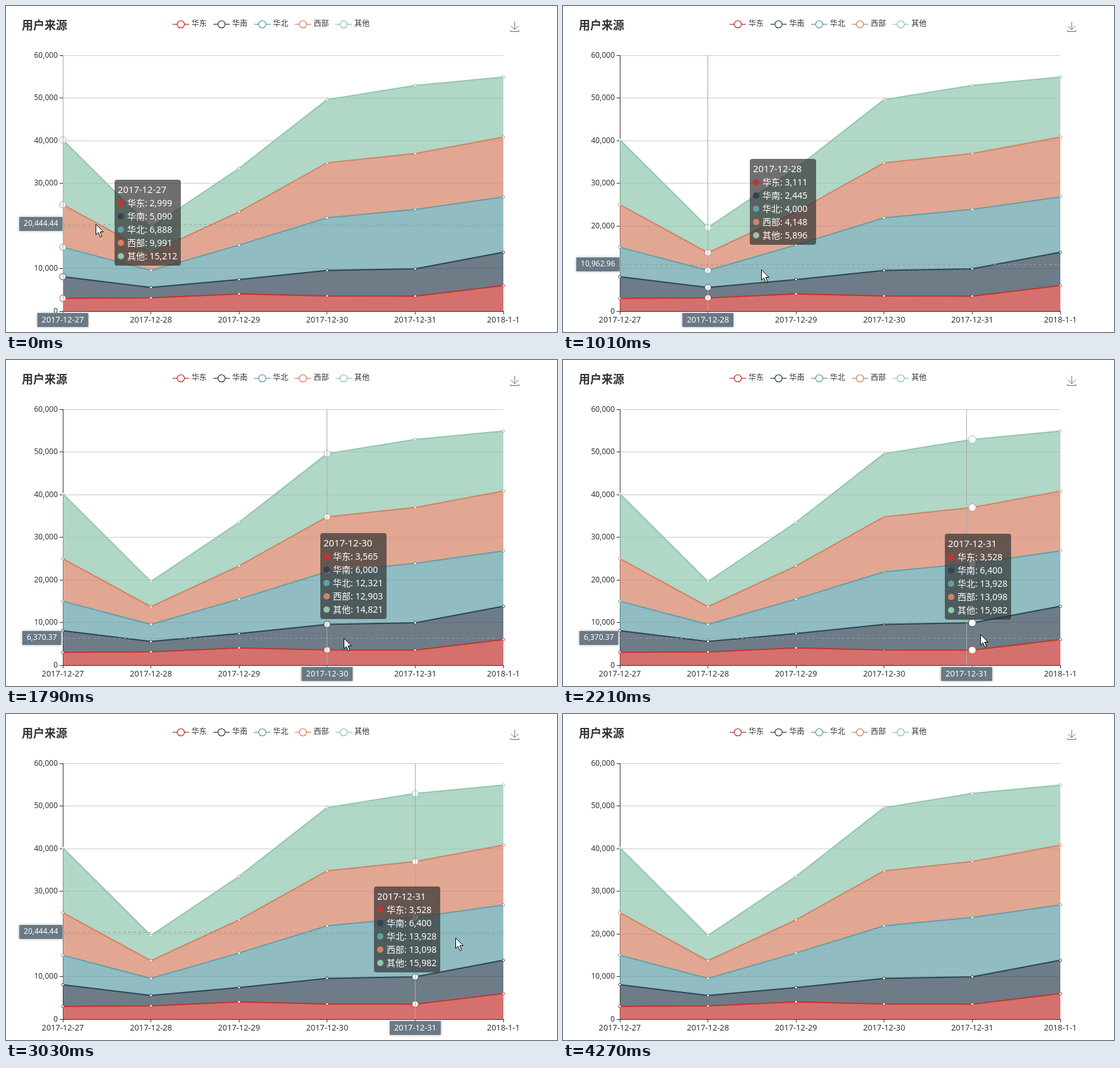
Recreate the animation shown at these times as an HTML page with a canvas. Size 873 by 516 pixels, loop 4420 ms.

```html
<!DOCTYPE html>
<html lang="zh">
<head>
<meta charset="utf-8">
<title>用户来源</title>
<style>
  html, body { margin: 0; width: 100%; height: 100%; overflow: hidden; background: #fff; }
  canvas { display: block; }
</style>
</head>
<body>
<canvas id="chart" width="873" height="516"></canvas>
<script>
const ctx = document.getElementById('chart').getContext('2d');
const LOOP = 4420, STEPS = 33;
const LEFT = 90, RIGHT = 788, TOP = 78, BASE = 483, MAX = 60000;
const FAMILY = '"Noto Sans", "Noto Sans CJK SC", "Noto Sans CJK", sans-serif';
const DATE_FONT = 12.8;

const days = ['2017-12-27', '2017-12-28', '2017-12-29', '2017-12-30', '2017-12-31', '2018-1-1'];
const series = [
  { name: '华东', color: '#c23531', data: [2999, 3111, 4040, 3565, 3528, 6000] },
  { name: '华南', color: '#2f4554', data: [5090, 2445, 3380, 6000, 6400, 7800] },
  { name: '华北', color: '#61a0a8', data: [6888, 4000, 8080, 12321, 13928, 12984] },
  { name: '西部', color: '#d48265', data: [9991, 4148, 7760, 12903, 13098, 14028] },
  { name: '其他', color: '#91c7ae', data: [15212, 5896, 10220, 14821, 15982, 14091] }
];

// Key points as [step, x, y]; the chart trails the cursor by one step.
const STEP = 0, X = 1, Y = 2;
const cursorPath = [[0, 142, 345], [3, 144, 377], [4, 145, 386], [11, 440, 440], [15, 567, 440],
  [16, 640, 440], [17, 661, 434], [20, 704, 349], [21, 710, 337], [24, 713, 362], [25, 733, 373],
  [26, 754, 393], [29, 822, 500]];
const tipPath = [[0, 172, 275], [4, 165, 210], [12, 427, 273], [17, 605, 275], [19, 691, 371],
  [21, 579, 213], [22, 584, 319], [24, 581, 227], [26, 582, 291], [28, 636, 270]];
const POINTER_END = 29, CURSOR_END = 30;

const mix = (a, b, p) => a + (b - a) * p;
const easeOut = p => 1 - (1 - Math.min(p, 1)) ** 3;
const xOf = i => mix(LEFT, RIGHT, i / 5);
const yOf = v => mix(BASE, TOP, v / MAX);
const crisp = v => Math.floor(v) + 0.5;

// Steps last 120 ms plus pauses of 30 ms that become more frequent.
const timeOf = step => 120 * step + 30 * Math.floor(Math.max(step / 4, 0.6 * (step - 8))) - 10;

// Reads column `to` of a path where its rising column `from` reaches `value`.
function lookup(path, from, value, to) {
  if (value <= path[0][from]) return path[0][to];
  const next = path.findIndex(key => key[from] > value);
  if (next < 0) return path[path.length - 1][to];
  const a = path[next - 1], b = path[next];
  return mix(a[to], b[to], (value - a[from]) / (b[from] - a[from]));
}

const pointAt = (path, step) => [X, Y].map(axis => Math.round(lookup(path, STEP, step, axis)));

// A day becomes active when the cursor passes halfway to it.
const switches = days.map((_, i) => i ? lookup(cursorPath, X, xOf(i - 0.5), STEP) + 1 : -9);

let total = days.map(() => 0);
const stackLine = () => total.map((v, i) => [xOf(i), yOf(v)]);
for (const s of series) {
  s.bottom = stackLine();
  total = total.map((v, i) => v + s.data[i]);
  s.top = stackLine();
}

function trace(points, close) {
  ctx.beginPath();
  points.forEach(([x, y]) => ctx.lineTo(x, y));
  if (close) ctx.closePath();
}

function stroke(points, color, width = 1) {
  trace(points);
  ctx.strokeStyle = color;
  ctx.lineWidth = width;
  ctx.stroke();
}

function circle(x, y, r, fill, outline, width = 1) {
  ctx.beginPath();
  ctx.arc(x, y, r, 0, 2 * Math.PI);
  ctx.fillStyle = fill;
  ctx.fill();
  if (!outline) return;
  ctx.strokeStyle = outline;
  ctx.lineWidth = width;
  ctx.stroke();
}

function text(str, x, y, { size = 12, align = 'left', color = '#333', weight = 400 } = {}) {
  ctx.font = `${weight} ${size}px ${FAMILY}`;
  ctx.textAlign = align;
  ctx.fillStyle = color;
  ctx.fillText(str, x, y + size * 0.36);
}

function drawHeader() {
  text('用户来源', 25, 31, { size: 18, weight: 700 });
  series.forEach(({ name, color }, i) => {
    const x = 264 + i * 64.5;
    stroke([[x, 29], [x + 26, 29]], color, 1.3);
    circle(x + 13, 29, 5.7, '#fff', color, 1.3);
    text(name, x + 30, 28);
  });
  stroke([[806, 25], [806, 37]], '#666');
  stroke([[800, 31.5], [806, 37.5], [812, 31.5]], '#666');
  stroke([[799.5, 38], [799.5, 40.5], [812.5, 40.5], [812.5, 38]], '#666');
}

function drawAxes() {
  for (let v = 0; v <= MAX; v += 10000) {
    const y = crisp(yOf(v));
    if (v) stroke([[LEFT, y], [RIGHT, y]], '#ccc');
    stroke([[LEFT - 5, y], [LEFT, y]], '#333');
    text(v.toLocaleString('en-US'), 82, y - 1, { align: 'right' });
  }
  stroke([[LEFT + 0.5, TOP], [LEFT + 0.5, BASE]], '#333');
  stroke([[LEFT, BASE + 0.5], [RIGHT, BASE + 0.5]], '#333');
  days.forEach((day, i) => {
    const x = crisp(xOf(i));
    stroke([[x, BASE], [x, BASE + 5]], '#333');
    text(day, xOf(i), 496, { size: DATE_FONT, align: 'center' });
  });
}

function drawSeries(radiusOf) {
  for (const { top, bottom, color } of series) {
    trace([...top, ...bottom.slice().reverse()], true);
    ctx.globalAlpha = 0.7;
    ctx.fillStyle = color;
    ctx.fill();
    ctx.globalAlpha = 1;
  }
  ctx.lineJoin = 'bevel';
  for (const { top, color } of series) stroke(top, color, 2);
  for (const { top, color } of series) {
    top.forEach(([x, y], i) => circle(x, y, radiusOf(i), '#fff', color));
  }
}

function label(str, x, y, size, anchor) {
  ctx.font = `500 ${size}px ${FAMILY}`;
  const width = ctx.measureText(str).width + 14;
  const left = x - width * anchor;
  ctx.save();
  ctx.shadowColor = '#aaa';
  ctx.shadowBlur = 4;
  ctx.fillStyle = '#6a7985';
  ctx.fillRect(left, y - 11, width, 22);
  ctx.restore();
  text(str, left + 7, y - 1, { size, color: '#fff', weight: 500 });
}

function drawPointer(x, y, day) {
  stroke([[crisp(x), TOP], [crisp(x), BASE]], '#aaa');
  ctx.setLineDash([4, 4]);
  stroke([[LEFT, y + 0.5], [RIGHT, y + 0.5]], '#999');
  ctx.setLineDash([]);
  const value = ((BASE - y) * MAX / (BASE - TOP))
    .toLocaleString('en-US', { minimumFractionDigits: 2, maximumFractionDigits: 2 });
  label(value, 89.5 - 2 * (9 - value.length), y, 12, 1);
  label(days[day], x, 497, DATE_FONT, 0.5);
}

function drawTooltip([x, y], day) {
  ctx.fillStyle = 'rgba(50,50,50,0.7)';
  ctx.beginPath();
  ctx.roundRect(x, y, 105, 136, 4);
  ctx.fill();
  text(days[day], x + 5, y + 15.5, { size: 14.8, color: '#fff', weight: 500 });
  series.forEach(({ name, color, data }, i) => {
    const row = y + 36.5 + i * 21;
    circle(x + 10, row + 0.5, 5, color);
    text(`${name}: ${data[day].toLocaleString('en-US')}`, x + 20, row, { size: 14, color: '#fff', weight: 500 });
  });
}

function drawCursor([x, y]) {
  ctx.save();
  ctx.translate(x + 0.5, y + 0.5);
  trace([[0, 0], [0, 16.5], [3.8, 13], [6.8, 20], [9.4, 19], [6.5, 12], [11.8, 12]], true);
  ctx.fillStyle = '#fff';
  ctx.fill();
  ctx.strokeStyle = '#000';
  ctx.lineWidth = 1;
  ctx.stroke();
  ctx.restore();
}

function draw(step) {
  const hovering = step < POINTER_END;
  const day = switches.filter(s => s <= step).length - 1;
  const age = step - switches[day];
  const progress = easeOut(age / 1.4);
  const marked = progress < 0.2 ? day - 1 : day;
  const fresh = marked === day && age < 1;

  function radiusOf(i) {
    if (hovering && i === marked) return fresh ? 6 : 5;
    return hovering && fresh && i === day - 1 ? 1.2 : 2;
  }

  ctx.fillStyle = '#fff';
  ctx.fillRect(0, 0, 873, 516);
  drawHeader();
  drawAxes();
  drawSeries(radiusOf);
  if (hovering) {
    drawPointer(mix(xOf(Math.max(day - 1, 0)), xOf(day), progress), pointAt(cursorPath, step - 1)[1], day);
    drawTooltip(pointAt(tipPath, step), day);
  }
  if (step < CURSOR_END) drawCursor(pointAt(cursorPath, step));
}

const start = performance.now();
function frame() {
  const t = Math.max(0, performance.now() - start) % LOOP;
  let step = 0;
  while (step + 1 < STEPS && timeOf(step + 1) <= t) step++;
  draw(step);
  requestAnimationFrame(frame);
}
frame();
</script>
</body>
</html>
```
